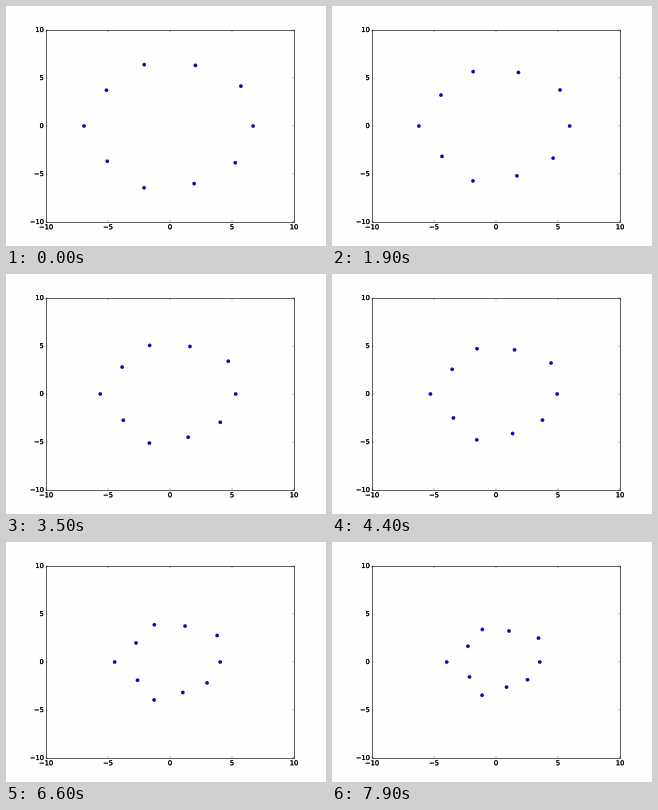
A matplotlib script for the animation above (8 s loop, 320 px wide and 240 px high).

```python
import numpy as np
import matplotlib as mpl
import matplotlib.pyplot as plt
from matplotlib.animation import FuncAnimation
from matplotlib.patheffects import withStroke

mpl.style.use("classic")
mpl.rcParams.update({
    "font.family": "DejaVu Sans",
    "figure.facecolor": "#fefefe",
    "axes.facecolor": "#fefefe",
    "axes.linewidth": 1.1,
    "savefig.dpi": "figure",
})

FRAMES = 80
STEP_MS = 100
LIMIT = 10    # axis limit, and the ring's first radius
ELAPSED = 82  # steps already walked when the loop begins

# Every dot walks straight to the centre at its own speed.
SPEED = np.array([0.0402, 0.0358, 0.0410, 0.0400, 0.0447,
                  0.0374, 0.0457, 0.0395, 0.0450, 0.0426])
ANGLE = 2 * np.pi * np.arange(len(SPEED)) / len(SPEED)


def ring(step):
    radius = LIMIT - SPEED * (step + ELAPSED)
    return np.column_stack([radius * np.cos(ANGLE), radius * np.sin(ANGLE)])


fig = plt.figure(figsize=(8, 6), dpi=40)
ax = fig.add_subplot(xlim=(-LIMIT, LIMIT), ylim=(-LIMIT, LIMIT))
ticks = range(-LIMIT, LIMIT + 1, 5)
ax.set_xticks(ticks)
ax.set_yticks(ticks)

# Outlined labels are placed with subpixel precision.
for label in ax.get_xticklabels() + ax.get_yticklabels():
    label.set_path_effects([withStroke(linewidth=0.3, foreground="black")])

# One size per dot keeps the dots from snapping to whole pixels.
dots = ax.scatter(*ring(0).T, s=[36] * len(SPEED), c="#0000f0",
                  edgecolors="black", linewidths=0.5, snap=False)


def update(i):
    dots.set_offsets(ring(i))
    return dots,


anim = FuncAnimation(fig, update, frames=FRAMES, interval=STEP_MS,
                     repeat=True, repeat_delay=0)
plt.show()
```
